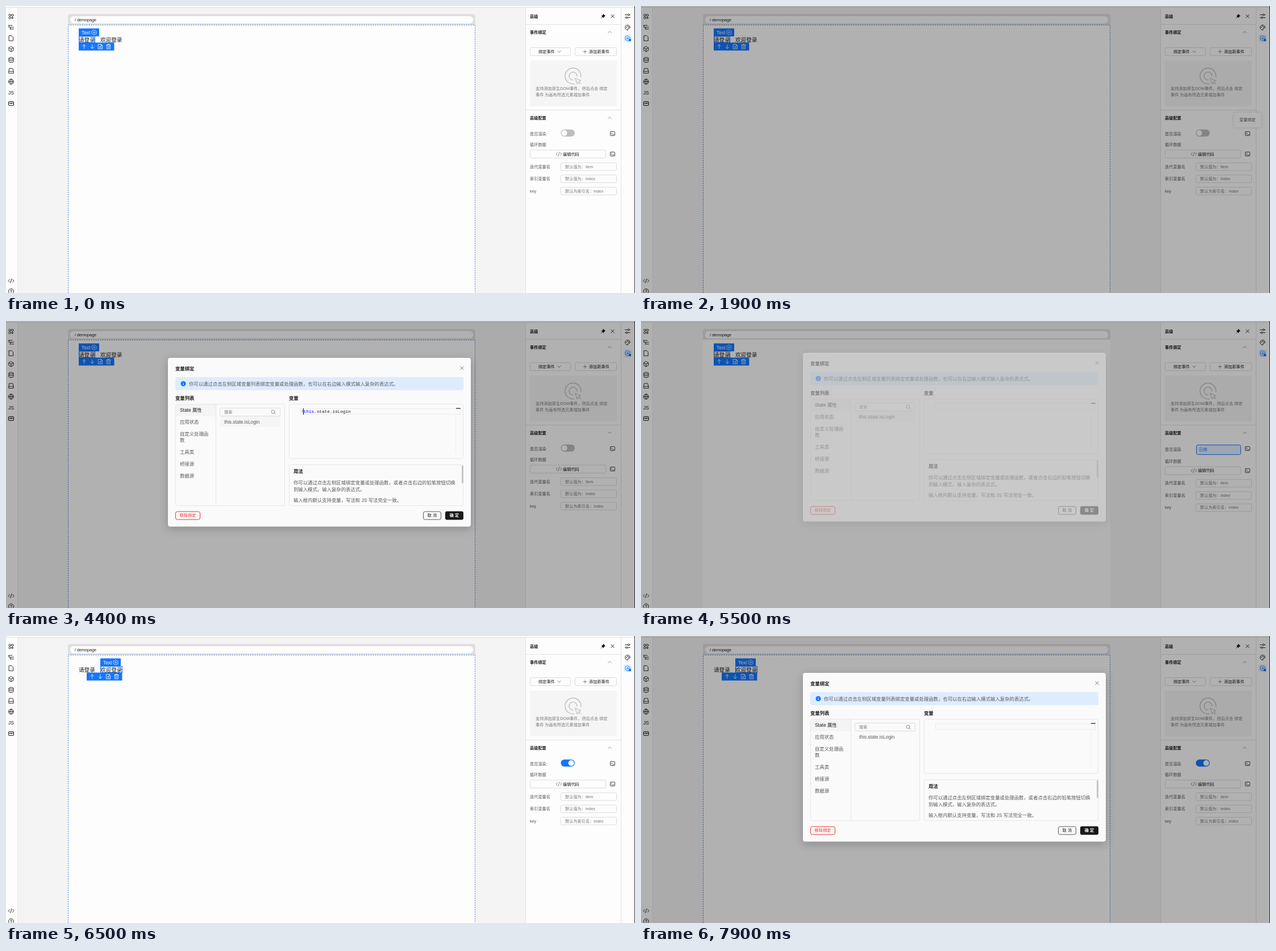
These frames come from a looping animation (1107 px wide and 506 px high, 8000 ms). An HTML page with a canvas:

```html
<!DOCTYPE html>
<html lang="zh-CN">
<head>
<meta charset="utf-8">
<title>变量绑定</title>
<style>
html, body { margin: 0; width: 100%; height: 100%; overflow: hidden; background: #fdfdfd; }
canvas { display: block; width: 1107px; height: 506px; }
</style>
</head>
<body>
<canvas id="stage" width="1107" height="506"></canvas>
<script>
const W = 1107, H = 506, LOOP = 8000, STEP = 100;
const stage = document.getElementById('stage').getContext('2d');
const layer = Object.assign(document.createElement('canvas'), { width: W, height: H }).getContext('2d');
let c = stage; // context the helpers draw on
const SANS = '"Liberation Sans", "Noto Sans CJK SC", "Noto Sans CJK", sans-serif';
const MONO = '"Liberation Mono", "DejaVu Sans Mono", monospace';
const BLUE = '#1476ff', INK = '#191919', GRAY = '#595959', LINE = '#dcdcdc';

const ramp = (t, a, b) => Math.max(0, Math.min(1, (t - a) / (b - a)));
const within = (t, a, b) => t >= a && t < b;

function rect(x, y, w, h, color) {
  c.fillStyle = color;
  c.fillRect(x, y, w, h);
}

// Rounded box; its edge falls on pixel centres.
function box(x, y, w, h, r, fill, edge) {
  c.beginPath();
  if (edge) c.roundRect(x + .5, y + .5, w - 1, h - 1, r);
  else c.roundRect(x, y, w, h, r);
  if (fill) { c.fillStyle = fill; c.fill(); }
  if (edge) { c.strokeStyle = edge; c.lineWidth = 1; c.stroke(); }
}

// Text with its vertical middle at y.
function text(s, x, y, { size = 7.2, color = INK, bold = false, align = 'left', font = SANS } = {}) {
  c.font = `${bold ? '600 ' : ''}${size}px ${font}`;
  c.textAlign = align;
  c.fillStyle = color;
  c.fillText(s, x, y + size * .36);
}

function icon(x, y, d, color = INK, width = .9, fill = false) {
  c.save();
  c.translate(x, y);
  c.lineWidth = width;
  c.lineCap = c.lineJoin = 'round';
  c.strokeStyle = c.fillStyle = color;
  const p = new Path2D(d);
  if (fill) c.fill(p);
  c.stroke(p);
  c.restore();
}

const ring = (x, y, r) => `M${x + r} ${y}a${r} ${r} 0 1 0 ${-2 * r} 0a${r} ${r} 0 1 0 ${2 * r} 0`;
const HEX = 'M0-4.5L4-2.2V2.2L0 4.5L-4 2.2V-2.2Z';
const ICON = {
  blocks: ring(-2.3, -2.3, 1.8) + ring(2.3, -2.3, 1.8) + ring(-2.3, 2.3, 1.8) + 'M2.3 .4V4.2M.4 2.3H4.2',
  tree: 'M-4.5-3.5H2M-2-.3H4.5M-2 3H4.5M-4-3.5V-.3H-2M-1 0V3',
  page: 'M-3.5-4.5H1L3.5-2V4.5H-3.5Z',
  cube: HEX + 'M-4-2.2L0 0L4-2.2M0 0V4.5',
  data: 'M-4-3A4 1.6 0 0 1 4-3A4 1.6 0 0 1-4-3V3A4 1.6 0 0 0 4 3V-3M-4 0A4 1.6 0 0 0 4 0',
  drive: 'M-2.8-4.2H2.8L4.2 1V4.2H-4.2V1ZM-4.2 1H4.2',
  globe: ring(0, 0, 4.5) + 'M-4.5 0H4.5M0-4.5Q-4 0 0 4.5Q4 0 0-4.5',
  code: 'M-2.5-2.5L-5 0L-2.5 2.5M2.5-2.5L5 0L2.5 2.5M1-3.5L-1 3.5',
  help: ring(0, 0, 4.5) + 'M-1.4-1A1.4 1.4 0 1 1 0 .6V1.2M0 2.6V2.7',
  sliders: 'M-4.5-2.5H0M3.4-2.5H4.5M-4.5 2.5H-3M.5 2.5H4.5' + ring(1.7, -2.5, 1.5) + ring(-1.3, 2.5, 1.5),
  palette: 'M0 4.3A4.4 4.4 0 1 1 4.4 0Q4.2 1.6 1.6 1.2Q-.2 1.4 .8 3Q1 4.2 0 4.3' +
    ring(-2, -.6, .5) + ring(0, -2.3, .5) + ring(2.1, -1, .5),
  gear: HEX + ring(0, 0, 1.4),
  cross: 'M-2.8-2.8L2.8 2.8M2.8-2.8L-2.8 2.8',
  pin: 'M.5-3.5L3.5-.5L2.4 0L1 1.5L.6 2.8L-2.8-.6L-1.5-1L0-2.4ZM-1 1L-3.5 3.5',
  up: 'M-2.8 1.4L0-1.4L2.8 1.4',
  down: 'M-2.6-1.3L0 1.3L2.6-1.3',
  plus: 'M-3 0H3M0-3V3',
  shell: 'M-3.2-3.5H3.2Q4-3.5 4-2.7V2.7Q4 3.5 3.2 3.5H-3.2Q-4 3.5-4 2.7V-2.7Q-4-3.5-3.2-3.5M-2.2-1.3L-.8 0L-2.2 1.3M.5 1.5H2.2',
  arrowUp: 'M0 3.5V-3.5M-3-.5L0-3.5L3-.5',
  arrowDown: 'M0-3.5V3.5M-3 .5L0 3.5L3 .5',
  copy: 'M-3.5-4H1.5L3.5-2V4H-3.5ZM1.3-4V-1.8H3.5M-1.8-.2H1.6M-1.8 1.8H1.6',
  bin: 'M-4-2.6H4M-1.5-2.6V-4H1.5V-2.6M-3-2.6V4H3V-2.6M-1-.6V2M1-.6V2',
  search: ring(-.5, -.5, 3) + 'M1.8 1.8L3.8 3.8',
};

function leftBar() {
  rect(0, 3, 20, H, '#fdfdfd');
  rect(20, 3, 1, H, '#e6e6e6');
  ['blocks', 'tree', 'page', 'cube', 'data', 'drive', 'globe'].forEach((name, i) =>
    icon(9, 18.5 + i * 19.15, ICON[name]));
  text('JS', 9, 153, { size: 8.6, align: 'center' });
  box(4, 168, 10, 8, 1.5, null, INK);
  text('VAR', 9, 172, { size: 3.7, bold: true, align: 'center' });
  icon(9, 484.5, ICON.code);
  icon(9, 503, ICON.help);
}

function selection(second) {
  const x = second ? 166 : 128, w = second ? 39 : 29, bar = second ? 142 : 128;
  c.strokeStyle = BLUE;
  c.lineWidth = 1;
  c.strokeRect(x + .5, 53.5, w - 1, 11);
  rect(x, 39.5, 36, 14, BLUE);
  text('Text', x + 5, 46.7, { size: 8.4, color: '#fff' });
  icon(x + 27, 46.7, ICON.gear, '#fff', .7);
  rect(bar, 64.5, 62.4, 14, BLUE);
  ['arrowUp', 'arrowDown', 'copy', 'bin'].forEach((name, i) =>
    icon(bar + 9.5 + i * 14.3, 71.5, ICON[name], '#fff', .8));
}

function page(second, dashed) {
  box(109, 14, 717, 24, 4, '#e0e0e0');
  box(113, 18, 709, 12.5, 6, '#fdfdfd');
  text('/', 121, 24);
  text('demopage', 125, 24);
  rect(109, 33, 717, H, '#fdfdfd');
  selection(second);
  text('请登录', 128, 59.5, { size: 9.6 });
  text('欢迎登录', 166, 59.5, { size: 9.6 });
  if (!dashed) return;
  c.save();
  c.setLineDash([2, 2]);
  c.lineWidth = 1;
  c.strokeStyle = '#3672d2';
  c.strokeRect(109.5, 33.5, 716, H);
  c.restore();
}

function toggle(on) {
  box(976.5, 217.8, 24.4, 12.4, 6.2, on ? BLUE : '#bdbdbd');
  box(on ? 989.7 : 977.7, 219, 10, 10, 5, '#fdfdfd');
}

function field(label, hint, y) {
  text(label, 922, y, { color: GRAY });
  box(976, y - 7, 99, 14.5, 2, '#fdfdfd', LINE);
  text(hint, 984, y, { color: '#777' });
}

function panel({ bound, on, hover, tip }) {
  rect(914, 3, 192, H, '#fdfdfd');
  rect(914, 3, 1, H, '#e2e2e2');
  rect(1082, 3, 1, H, '#e2e2e2');
  text('高级', 922, 18, { bold: true });
  icon(1051, 18, ICON.pin, INK, .8, true);
  icon(1067.5, 18, ICON.cross);
  rect(914, 32, 168, 1, '#e2e2e2');

  text('事件绑定', 922, 46, { bold: true });
  icon(1062.5, 46, ICON.up, '#777', .8);
  box(922, 73, 72, 15, 2, null, LINE);
  text('绑定事件', 937, 80.5);
  icon(973.5, 80.5, ICON.down, GRAY, .8);
  box(1001, 73, 74, 15, 2, null, LINE);
  icon(1019, 80.5, ICON.plus, GRAY, .7);
  text('添加新事件', 1026, 80.5);
  rect(922, 96, 153, 81, '#f5f5f5');
  icon(998, 123.5, 'M13.8 1.5A14 14 0 1 0 2 13.8M7 0A7 7 0 1 0 0 7', '#b5b5b5', 1.2);
  icon(998, 123.5, 'M4 4L14 8L10 9.5L13.5 13L12.3 14L9 10.7L7.5 14Z', '#b5b5b5', 1);
  text('支持添加原生DOM事件，然后点击 绑定', 932, 145.5, { color: '#777' });
  text('事件 为画布所选元素增加事件', 932, 156.5, { color: '#777' });
  rect(914, 183, 168, 1, '#e2e2e2');

  const dy = bound ? 2.8 : 0;
  text('高级配置', 922, 197, { bold: true });
  icon(1062.5, 197, ICON.up, '#777', .8);
  text('是否渲染', 922, 225 + dy / 2, { color: GRAY });
  if (bound) {
    box(977, 218, 79, 18, 3, '#dfecff', BLUE);
    text('已绑', 982, 226.5, { color: BLUE });
  } else toggle(on);
  if (hover) box(1061, 218, 14, 14, 2, '#f0f0f0');
  icon(1067.5, 225, ICON.shell, INK, .8);
  text('循环数据', 922, 244.5 + dy, { color: GRAY });
  box(922, 253.5 + dy, 134, 15, 2, null, LINE);
  icon(973, 261 + dy, ICON.code, GRAY, .7);
  text('编辑代码', 980, 261 + dy);
  icon(1067.5, 261 + dy, ICON.shell, INK, .8);
  field('迭代变量名', '默认值为：item', 283 + dy);
  field('索引变量名', '默认值为：index', 304.5 + dy);
  field('key', '默认为索引名：index', 326 + dy);

  icon(1094, 18, ICON.sliders);
  icon(1094, 38, ICON.palette);
  box(1087, 50, 14, 14, 2, '#e4efff');
  icon(1094, 57, ICON.gear, BLUE);
  rect(1096, 58, 4, 4, BLUE);
  rect(1106, 0, 1, H, '#333');

  if (tip) {
    c.save();
    c.shadowColor = 'rgba(0,0,0,.14)';
    c.shadowBlur = 5;
    box(1043, 188, 49, 26, 3, '#fdfdfd');
    c.restore();
    text('变量绑定', 1053, 200.5, { color: GRAY });
  }
}

function editor(t) {
  box(498, 146, 307, 97, 3, null, '#e6e6e6');
  c.lineWidth = 1;
  c.strokeStyle = '#ebebeb';
  c.strokeRect(518.5, 154.5, 281, 10);
  rect(791, 165, 1, 68, '#efefef');
  rect(792, 153.5, 8, 1.3, '#333');
  if (!within(t, 3000, 5400)) return;
  const size = 7.7, adv = size * .6, negated = t >= 4400;
  const x = 519 + (negated ? adv : 0);
  if (negated) text('!', 519, 159.5, { size, font: MONO });
  text('this', x, 159.5, { size, font: MONO, color: '#0000ff' });
  text('.state.isLogin', x + 4 * adv, 159.5, { size, font: MONO });
  if (within(t, 3700, 4100) || within(t, 4400, 4900)) rect(negated ? 523 : 519, 154, 1, 11, '#000');
}

function dialog(t) {
  const big = { size: 8.4 }, head = { size: 8.4, bold: true }, soft = { size: 8.4, color: GRAY };
  c.save();
  c.shadowColor = 'rgba(0,0,0,.22)';
  c.shadowBlur = 16;
  c.shadowOffsetY = 4;
  box(285, 65, 533, 297.5, 4, '#fafafa');
  c.restore();

  text('变量绑定', 298, 84, head);
  icon(802.5, 83, ICON.cross, GRAY, .8);
  box(298, 99, 507, 23, 3, '#deecff');
  box(307.5, 106, 9, 9, 4.5, BLUE);
  rect(311.5, 108, 1, 1, '#fff');
  rect(311.5, 110, 1, 3, '#fff');
  text('你可以通过点击左侧区域变量列表绑定变量或处理函数，也可以在右边输入模式输入复杂的表达式。', 322, 110.5, soft);

  text('变量列表', 298, 135.5, head);
  box(298, 146, 193, 180, 3, null, '#e6e6e6');
  rect(299, 147, 70, 21, '#f4f4f4');
  rect(369, 146, 1, 180, '#e6e6e6');
  text('State 属性', 306, 157, big);
  ['应用状态', '自定义处理函'].forEach((s, i) => text(s, 306, 178 + i * 21, soft));
  text('数', 306, 210, soft);
  ['工具类', '桥接源', '数据源'].forEach((s, i) => text(s, 306, 231 + i * 21, soft));

  box(376, 153, 107, 15, 2, null, LINE);
  text('搜索', 384, 160.5, { color: '#777' });
  icon(470.5, 160.5, ICON.search, '#777', .8);
  if (within(t, 2600, 5700)) rect(377, 168, 106, 19, '#f5f5f5');
  const g = Math.round(89 - 64 * (t < 3200 ? ramp(t, 2500, 2800) : 0));
  text('this.state.isLogin', 384, 177.5, { size: 8.4, color: `rgb(${g},${g},${g})` });

  text('变量', 498, 136, head);
  editor(t);

  box(498, 253, 307, 73, 3, null, '#e6e6e6');
  text('用法', 506, 265, head);
  text('你可以通过点击左侧区域绑定变量或处理函数，或者点击右边的铅笔按钮切换', 506, 285, soft);
  text('到输入模式，输入复杂的表达式。', 506, 296.5, soft);
  text('输入框内默认支持变量，写法和 JS 写法完全一致。', 506, 316, soft);
  box(802, 254, 3, 32, 1.5, '#c6c6c6');

  box(298, 335.5, 44, 15, 3, null, '#f23030');
  text('移除绑定', 320, 342.7, { color: '#f23030', align: 'center' });
  box(734, 335.5, 32, 15, 3, null, GRAY);
  text('取 消', 750, 342.7, { align: 'center' });
  box(773, 335.5, 32, 15, 3, within(t, 5200, 5700) ? '#3a3a3a' : INK);
  text('确 定', 789, 342.7, { color: '#fff', bold: true, align: 'center' });
}

// The dialog fades and slides as one layer.
function showDialog(t, alpha) {
  c = layer;
  c.clearRect(0, 0, W, H);
  dialog(t);
  c = stage;
  c.globalAlpha = alpha;
  c.drawImage(layer.canvas, 0, Math.round(-13 * (1 - alpha)));
  c.globalAlpha = 1;
}

function draw(t) {
  const second = t >= 6200;
  const reopened = t >= 7600;
  const shade = reopened ? 1 : Math.min(ramp(t, 1700, 1900), 1 - ramp(t, 5500, 5800));
  const shown = reopened ? ramp(t, 7600, 7900) : Math.min(ramp(t, 1900, 2300), 1 - ramp(t, 5300, 5600));

  rect(0, 0, W, H, '#f4f4f4');
  rect(0, 0, W, 2, '#fdfdfd');
  rect(0, 2, W, 1, '#dedede');
  leftBar();
  page(second, !within(t, 5400, 5800));
  panel({
    bound: within(t, 5400, 6200),
    on: second,
    hover: within(t, 1600, 1900) || within(t, 7400, 7600),
    tip: within(t, 1800, 2200),
  });
  if (shade > 0) rect(0, 0, W, H, `rgba(0,0,0,${.3 * shade})`);
  if (shown > 0) showDialog(t, shown);
}

const start = performance.now();
function tick() {
  const t = (performance.now() - start) % LOOP;
  draw(Math.floor(t / STEP) * STEP);
  requestAnimationFrame(tick);
}
tick();
</script>
</body>
</html>
```
